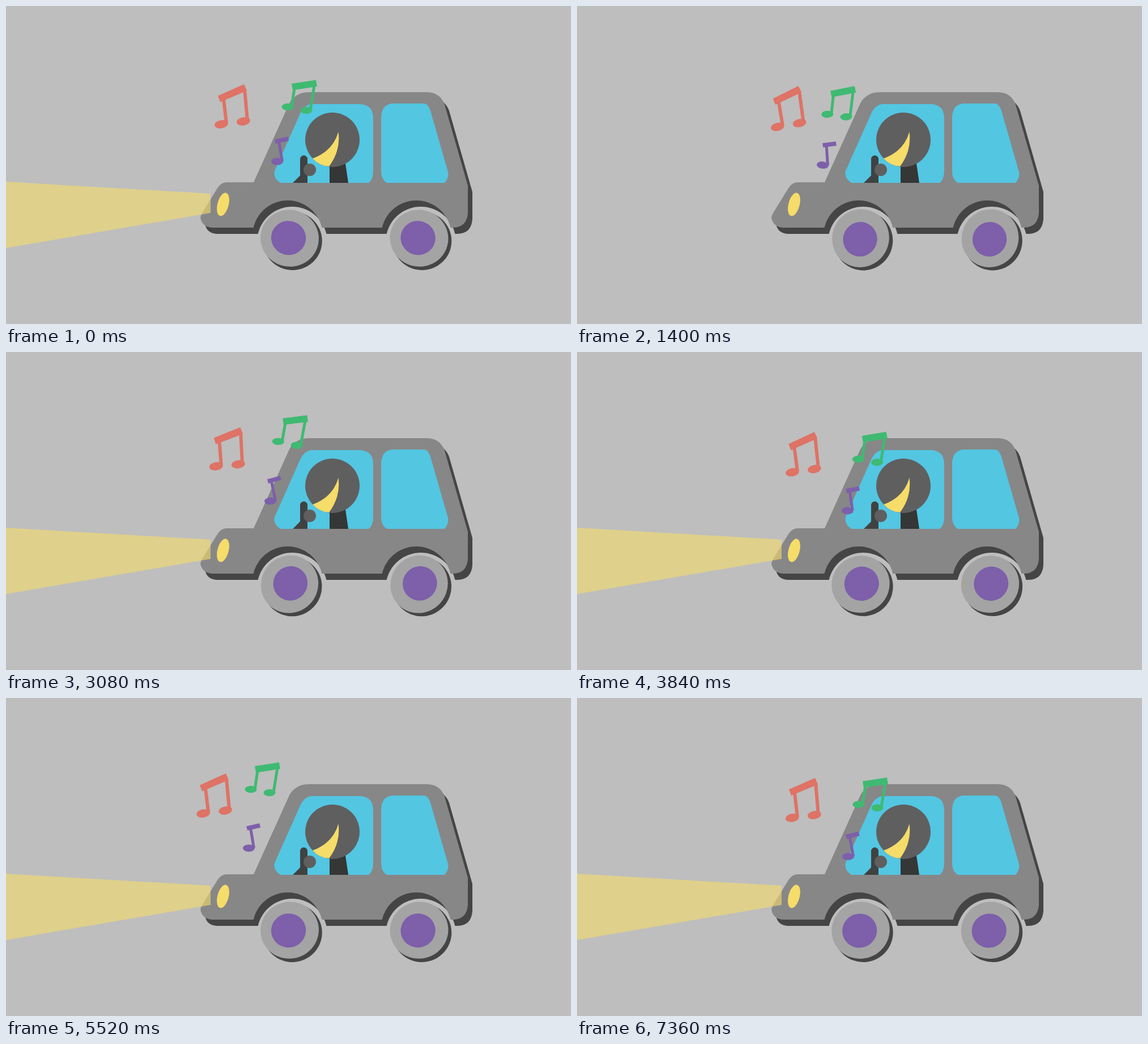
Recreate the animation shown at these times as an HTML page. Size 997 px wide and 561 px high, loop 7400 ms.

```html
<!DOCTYPE html>
<html>
<head>
<meta charset="utf-8">
<style>
  html, body { margin: 0; width: 100%; height: 100%; overflow: hidden; background: #bebebe; }
  svg { display: block; width: 100%; height: 100%; }
</style>
</head>
<body>
<svg viewBox="0 0 997 561">
  <defs>
    <path id="body" d="M437 311 L498 176 Q508 152 535 152 L742 152 Q766 152 774 174 L815 317 V365 Q813 391 788 391 H784.4
      A62 62 0 0 0 663.6 391 H557.4 A62 62 0 0 0 436.6 391 H364 Q346 390 343 373 Q344 368 348 362 L372 323 Q379 311 389 311 Z"/>
    <g id="wheel">
      <ellipse class="tyre" cx="5" cy="4.5" rx="52.3" ry="51.7" fill="#454545"/>
      <ellipse class="rim" rx="51.5" ry="50" fill="#a4a4a4"/>
      <ellipse class="hub" cx="2" rx="30.7" ry="30" fill="#7d5faa"/>
    </g>
  </defs>

  <use href="#body" x="8" y="11" fill="#454545"/>
  <use href="#body" fill="#878787"/>

  <g fill="#53c6e2">
    <path d="M474 291 L519 190 Q527 173 541 173 H624 Q648 174 648 198 V290 Q648 306 640 312 H484 Q471 303 474 291 Z"/>
    <path d="M662 196 Q663 173 683 172 H737 Q745 172 749 185 L780 293 Q782 302 774 312 H672 Q662 306 662 292 Z"/>
  </g>

  <path d="M571 278 H599 L604 312 H571 Z" fill="#353636"/>
  <path d="M506 312 L519 299 V270 A6.5 6.5 0 0 1 532 270 V312 Z" fill="#404242"/>
  <circle cx="536" cy="289" r="11" fill="#5f5f5f"/>
  <circle cx="576" cy="236" r="48" fill="#5f5f5f"/>
  <path d="M586.500 222 Q577 256 541 269 Q553 282 570 283 Q591 255 586.500 222 Z" fill="#f6dc69"/>

  <ellipse cx="383" cy="350" rx="9.800" ry="21" transform="rotate(15 383 350)" fill="#f6dc69"/>
  <path id="beam" d="M0 310 L361 331 V365 L0 427 Z" fill="#f6dc69" opacity=".6"/>

  <use href="#wheel" x="500.500" y="409.700"/>
  <use href="#wheel" x="729" y="409.700"/>

  <g id="red" fill="#de7366" stroke="#de7366">
    <path d="M-26 -18 L20 -38.500 L25 -27 L-22 -7 Z" stroke="none"/>
    <path d="M-16 -12 L-11 30 M21 -30 L26 26" stroke-width="6"/>
    <ellipse cx="-20" cy="32" rx="12" ry="7.200" transform="rotate(-10 -20 32)" stroke="none"/>
    <ellipse cx="19" cy="27" rx="12" ry="7.200" transform="rotate(-10 19 27)" stroke="none"/>
  </g>
  <g id="green" fill="#3fba72" stroke="#3fba72">
    <path d="M-14 -22 L29 -28.500 L31 -17 L-12 -10.500 Z" stroke="none"/>
    <path d="M-9 -14 L-14 19 M26 -19 L19 24" stroke-width="5"/>
    <ellipse cx="-21" cy="19" rx="10.500" ry="6.200" stroke="none"/>
    <ellipse cx="12" cy="25" rx="10.500" ry="6.200" stroke="none"/>
  </g>
  <g id="purple" fill="#7d5faa" stroke="#7d5faa">
    <path d="M-10 -20 L13 -25.500 L15 -18 L-8 -12.500 Z" stroke="none"/>
    <path d="M-2.500 -16 L3.500 18" stroke-width="5"/>
    <ellipse cx="-5.500" cy="18.500" rx="10.500" ry="6.300" stroke="none"/>
  </g>
</svg>
<script>
  const LOOP = 7400, SWAY = 3700, SPIN = 370, BLINK = 360, TAU = 2 * Math.PI;
  const $ = s => document.querySelector(s);
  const beam = $('#beam'), tyre = $('.tyre'), rim = $('.rim'), hub = $('.hub');

  // rest position, sway width, bob, hop height, tilt on the way out and back
  const notes = [
    { el: $('#red'), x: 400, y: 179.5, sway: 16, bob: 1.2, hop: 8, out: -3.8, back: -2.5 },
    { el: $('#green'), x: 518, y: 169, sway: 32.5, bob: 3, hop: 27, out: -3.5, back: -1.6 },
    { el: $('#purple'), x: 484, y: 261.3, sway: 25, bob: 2.3, hop: 15, out: 9, back: 2 }
  ];

  function hopAt(t) {
    const p = (t + 60) % 2440 / 1400;
    return t < 7000 && p < 1 ? Math.sqrt(Math.sin(Math.PI * p)) : 0;
  }

  function draw(t) {
    const a = TAU * t / SWAY, s = Math.sin(a), hop = hopAt(t);
    for (const n of notes) {
      const x = n.x - n.sway * (1 - Math.cos(a));
      const y = n.y + n.bob * s - n.hop * hop;
      const tilt = s * (s > 0 ? n.out : n.back);
      n.el.setAttribute('transform', `translate(${x} ${y}) rotate(${tilt})`);
    }

    const spin = 194 + 360 * t / SPIN;
    rim.setAttribute('transform', `rotate(${spin})`);
    hub.setAttribute('transform', `rotate(${spin})`);
    tyre.setAttribute('transform', `rotate(${spin} 5 4.5)`);

    const lit = t >= 8 * BLINK || Math.floor(t / BLINK) % 2 === 0;
    beam.style.display = lit ? '' : 'none';
  }

  const start = performance.now();
  function tick() {
    draw((performance.now() - start) % LOOP);
    requestAnimationFrame(tick);
  }
  tick();
</script>
</body>
</html>
```
